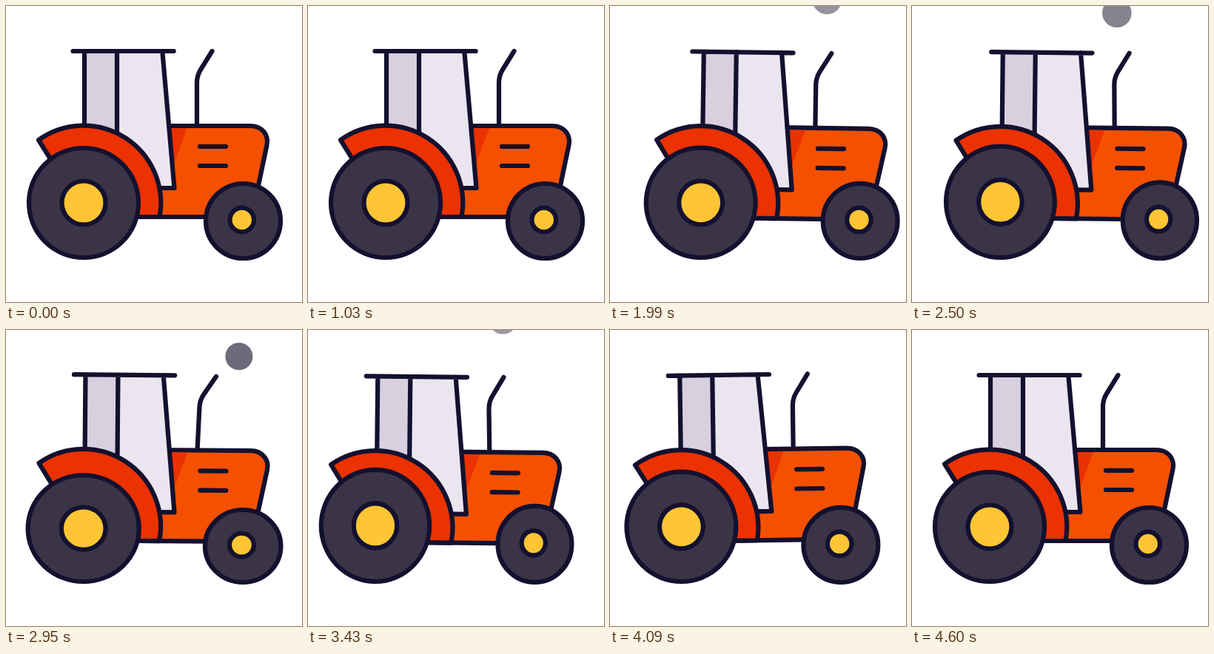
An HTML page for the animation above (4.75 s loop, 400 by 400 pixels).

```html
<!DOCTYPE html>
<html lang="en">
<head>
<meta charset="utf-8">
<title>Tractor</title>
<style>
html, body { margin: 0; width: 100%; height: 100%; overflow: hidden; background: #fff; }
svg { display: block; width: 100vw; height: 100vh; }
.ln { stroke: #13112f; stroke-width: 6.2; stroke-linecap: round; stroke-linejoin: round; }
</style>
</head>
<body>
<svg viewBox="0 0 400 400">
  <g id="smoke" fill="none" stroke="#3a3549"></g>
  <g id="body">
    <path id="pipe" class="ln" fill="none" d="M258 160V104Q258 94 263 86L278.500 61"/>
    <path class="ln" fill="#f55000" d="M160 162H330C346 162 355.500 174 352.500 188L337 262V285H150V200Z"/>
    <path fill="#ea3200" d="M215 165H245L229 208L222 226Z"/>
    <path class="ln" fill="none" d="M262 189.800H297M262 216H297"/>
    <path fill="#d8d0df" d="M106 61H150V190H106Z"/>
    <path fill="#ebe5f0" d="M150 61H211.300L227.500 246H150Z"/>
    <path class="ln" fill="none" d="M106 61V180M150 61V180M211.300 61L227.500 246H200M90.500 61H226.700"/>
    <path fill="#eb3200" d="M44 181A104.500 104.500 0 0 1 207.500 285H120L64 213Z"/>
    <path class="ln" fill="none" d="M64 213L44 181A104.500 104.500 0 0 1 207.500 285H150"/>
  </g>
  <g id="rear" class="ln">
    <circle cx="105" cy="266" r="74" fill="#3b3447"/>
    <circle cx="105" cy="266" r="29.500" fill="#ffc534"/>
  </g>
  <g id="front" class="ln">
    <circle cx="320.500" cy="290.500" r="50.500" fill="#3b3447"/>
    <circle cx="318.800" cy="289" r="16.300" fill="#ffc534"/>
  </g>
</svg>
<script>
const LOOP = 4750, START = 1030, END = 4600, STEP = 30;
const $ = id => document.getElementById(id);
const clamp = v => Math.max(0, Math.min(1, v));

// [time, value] keys
const DRIVE = [[START, 0], [2160, 18.7], [3640, -15.7], [END, 0]];
const TILT = [[START, 0], [1450, 0.7], [1990, 0.8], [2950, 0.45], [3430, 0.6], [4090, -0.8], [END, 0]];
// [birth, sideways drift]
const PUFFS = [[1175, -34], [1430, 24], [1690, 0], [1990, 36], [2270, -24], [2550, 14], [2826, 55], [3110, -9]];
const LIFE = 340;

const rings = PUFFS.map(() => $('smoke').appendChild(
  document.createElementNS('http://www.w3.org/2000/svg', 'circle')));

function track(keys, t) {
  if (t <= keys[0][0]) return keys[0][1];
  for (let i = 1; i < keys.length; i++) {
    const [t0, a] = keys[i - 1], [t1, b] = keys[i];
    if (t < t1) return a + (b - a) * (1 - Math.cos(Math.PI * (t - t0) / (t1 - t0))) / 2;
  }
  return keys[keys.length - 1][1];
}

function pose(t) {
  const amp = clamp((t - START) / 90) * clamp((END - t) / 90);
  const beat = Math.cos(2 * Math.PI * (t - START) / 300);
  return {
    x: track(DRIVE, t),
    tilt: track(TILT, t),
    y: amp * (0.3 + 1.2 * beat),
    squash: amp * (1 - 4.2 * beat) / 153,
    pipe: amp * (0.7 - 2.1 * beat)
  };
}

function spin(x, y, cx, cy, deg) {
  const a = deg * Math.PI / 180, c = Math.cos(a), s = Math.sin(a);
  return [cx + (x - cx) * c - (y - cy) * s, cy + (x - cx) * s + (y - cy) * c];
}

function pipeTip(p) {
  const a = spin(278.5, 61, 258, 160, p.pipe);
  const b = spin(a[0], a[1], 105, 285, p.tilt);
  return [b[0] + p.x, b[1] + p.y];
}

function wheel(id, cx, ground, p) {
  const sx = 1 + 0.5 * p.squash, sy = 1 - p.squash;
  $(id).setAttribute('transform',
    `translate(${cx + p.x} ${ground}) scale(${sx} ${sy}) translate(${-cx} ${-ground})`);
}

function puff(ring, birth, drift, t) {
  const age = t - birth, q = age / LIFE;
  if (age <= 0 || q > 1.2) {
    ring.setAttribute('visibility', 'hidden');
    return;
  }
  const [x, y] = pipeTip(pose(birth));
  const k = 1 - (1 - Math.min(q, 1)) ** 2;
  const r = 20 * (1 - Math.exp(-age / 48));
  const hole = Math.min(r, Math.max(0, 5.5 - age / 15));
  const set = {
    visibility: 'visible', cx: x + drift * k, cy: y + 4 - 87 * q,
    r: (r + hole) / 2, 'stroke-width': r - hole, 'stroke-opacity': 0.87 - 0.38 * q
  };
  for (const n in set) ring.setAttribute(n, set[n]);
}

function draw(ms) {
  let t = ms % LOOP;
  t = t < START ? 0 : Math.min(END, START + Math.floor((t - START) / STEP) * STEP);
  const p = pose(t);
  $('body').setAttribute('transform', `translate(${p.x} ${p.y}) rotate(${p.tilt} 105 285)`);
  $('pipe').setAttribute('transform', `rotate(${p.pipe} 258 160)`);
  wheel('rear', 105, 342.5, p);
  wheel('front', 320.5, 344, p);
  PUFFS.forEach(([birth, drift], i) => puff(rings[i], birth, drift, t));
}

let begin = null;
function tick(now) {
  if (begin === null) begin = now;
  draw(now - begin);
  requestAnimationFrame(tick);
}
draw(0);
requestAnimationFrame(tick);
</script>
</body>
</html>
```
